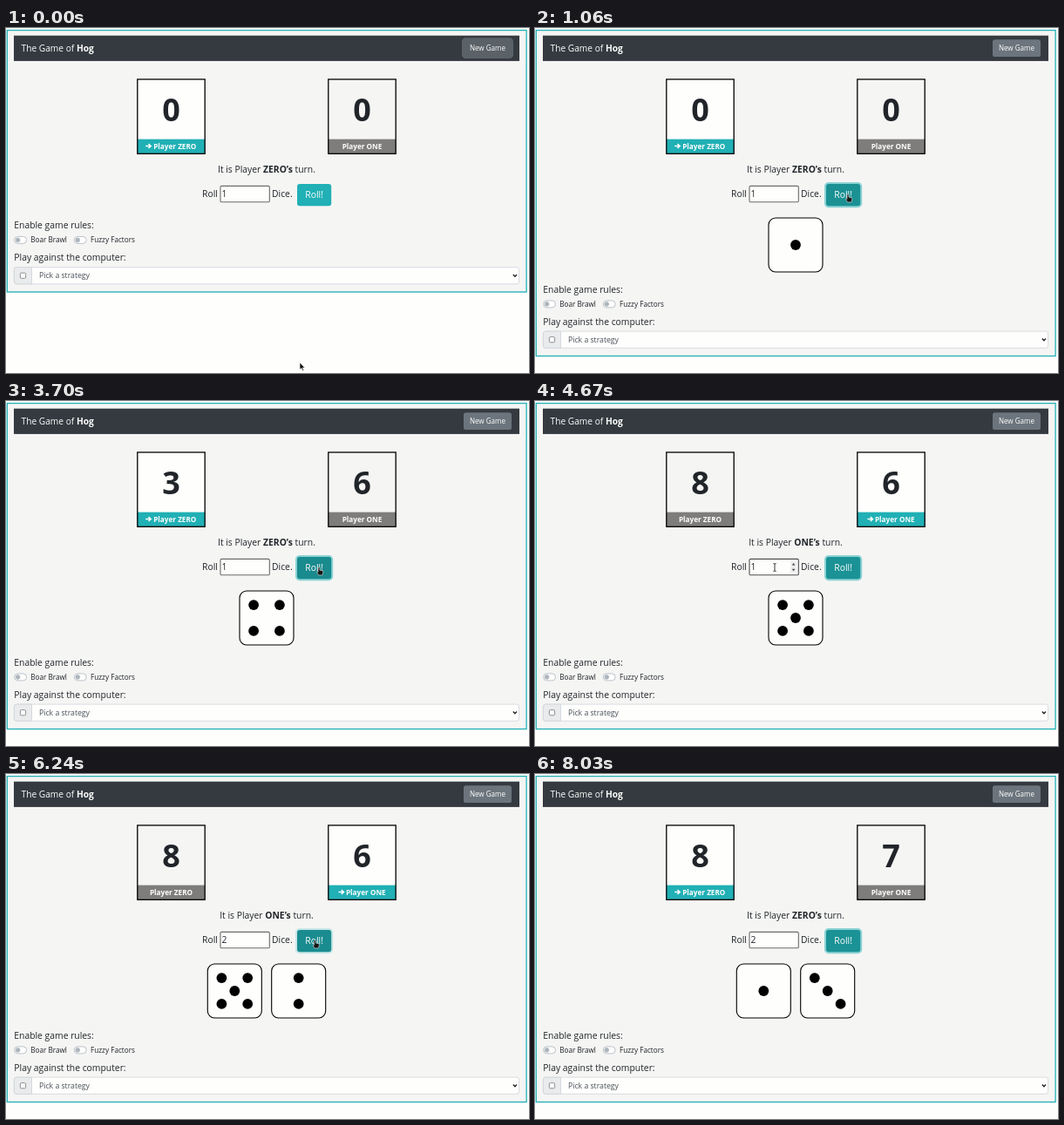
An HTML page for the animation above (8820 ms loop, 600 px wide and 396 px high).

```html
<!DOCTYPE html>
<html lang="en">
<head>
<meta charset="utf-8">
<title>The Game of Hog</title>
<style>
  html, body { margin: 0; width: 100%; height: 100%; overflow: hidden; background: #fefefd; }
  svg { display: block; width: 600px; height: 396px; }
  text { font-family: "Open Sans", "Noto Sans", sans-serif; fill: #212529; white-space: pre; }
  .b { font-weight: 700; }
  .mid { text-anchor: middle; }
  .head { font-size: 10.35px; font-weight: 500; }
  .body { font-size: 10.35px; }
  .small { font-size: 8.2px; }
  .light { fill: #fefefd; }
</style>
</head>
<body>
<svg viewBox="0 0 600 396">
  <rect id="frame" x="1.3" y="2.6" width="595.8" height="300.4" fill="#f5f5f4" stroke="#20b0b5" stroke-width="1.3"/>
  <rect x="9" y="8.7" width="580" height="29.2" fill="#343a40"/>
  <text class="light" x="17.5" y="26.6" font-size="10.2">The Game of <tspan class="b">Hog</tspan></text>
  <rect id="newRing" x="523" y="11.3" width="59" height="23.8" rx="4.5" fill="#5b6268"/>
  <rect id="newBtn" x="525" y="13.3" width="55" height="19.8" rx="2.7"/>
  <text class="light mid" x="552.5" y="26" font-size="8.05">New Game</text>

  <g id="cards"></g>

  <text id="turn" class="body mid" x="299" y="166.3">It is Player <tspan id="who" class="b"></tspan> turn.</text>
  <text class="body" x="225" y="194.2">Roll</text>
  <rect id="input" x="246" y="181.4" width="56.3" height="18.4" rx="1.4" fill="#fefefd"/>
  <g id="spin">
    <rect x="293" y="184" width="7.2" height="13.2" fill="#efefef"/>
    <path d="M294.8 188.4l1.8-2.4 1.8 2.4zM294.8 192.8l1.8 2.4 1.8-2.4z" fill="#444"/>
  </g>
  <text id="value" class="body" x="247.6" y="194.3"></text>
  <rect id="caret" x="253.7" y="185" width="0.8" height="11" fill="#111"/>
  <text class="body" x="305" y="194.2">Dice.</text>
  <rect id="rollRing" x="332" y="177" width="43.2" height="29.2" rx="4.8" fill="#20b0b5" fill-opacity=".5"/>
  <rect id="rollBtn" x="334" y="179" width="39.2" height="25.2" rx="3"/>
  <text class="light body mid" x="353.6" y="195.2">Roll!</text>

  <g id="dice"></g>

  <g id="options">
    <text class="head" x="9.3" y="230">Enable game rules:</text>
    <g id="toggles" fill="#fefefd" stroke="#adb5bd" stroke-width=".8"></g>
    <text class="small" x="28.2" y="246.4">Boar Brawl</text>
    <text class="small" x="97" y="246.4">Fuzzy Factors</text>
    <text class="head" x="9.3" y="267.2">Play against the computer:</text>
    <rect x="9.4" y="274.6" width="579.2" height="19.2" rx="2.7" fill="#fefefd" stroke="#ced4da" stroke-width=".8"/>
    <path d="M29.5 274.6H12.1a2.7 2.7 0 0 0-2.7 2.7V291.1a2.7 2.7 0 0 0 2.7 2.7H29.5z" fill="#e9ebec" stroke="#ced4da" stroke-width=".8"/>
    <rect x="16.4" y="281.1" width="6.2" height="6.2" rx="1.2" fill="#fefefd" stroke="#767676" stroke-width=".8"/>
    <text x="38" y="287.3" font-size="8.7" style="fill:#495057">Pick a strategy</text>
    <path d="M581.8 283l2.1 2.3 2.1-2.3" fill="none" stroke="#222" stroke-width="1.3"/>
  </g>

  <g id="cursor" stroke-linejoin="round">
    <path id="arrow" d="M0 0V8.2L1.9 6.5 3.2 9.4 4.5 8.8 3.2 6H5.8z" fill="#111" stroke="#fefefd" stroke-width=".6"/>
    <path id="hand" d="M-1 .8Q0-.6 1 .8V3.6L4 4.2Q5 4.6 4.8 6L4 9.4H-.4L-2.4 6.4Q-2.8 5-1 5.8z" fill="#151515" stroke="#dfe9e9" stroke-width=".6"/>
    <path id="beam" d="M-1.6-4.5Q0-4.5 0-3.5Q0-4.5 1.6-4.5M0-3.5V3.5M-1.6 4.5Q0 4.5 0 3.5Q0 4.5 1.6 4.5" fill="none" stroke="#222" stroke-width=".9"/>
  </g>
</svg>
<script>
const LOOP = 8820, GROW = 73.5, FADE = 150;
const FOCUS_INPUT = 5250, PRESSES = [790, 2080, 3610, 6180];
const NORMAL = [32, 176, 181], HOVER = [27, 146, 149], ACTIVE = [24, 132, 136];

const $ = id => document.getElementById(id);
const set = (el, attrs) => { for (const k in attrs) el.setAttribute(k, attrs[k]); };
const show = (el, on) => set(el, { visibility: on ? "visible" : "hidden" });
const clamp = v => Math.max(0, Math.min(1, v));
const mix = (a, b, p) => a.map((v, i) => v + (b[i] - v) * p);
const rgb = c => `rgb(${c.map(Math.round)})`;
const ease = p => p * p * (3 - 2 * p);

// index of the last entry that has begun
function current(list, t) {
  let i = 0;
  while (i + 1 < list.length && list[i + 1][0] <= t) i++;
  return i;
}

// [time, score zero, score one, player to move]
const turns = [[0, 0, 0, 0], [1670, 3, 0, 1], [3150, 3, 6, 0], [4670, 8, 6, 1], [7210, 8, 7, 0]];

// [time, faces...]
const rolls = [
  [0], [850, 4], [1060, 1], [1240, 5], [1480, 6], [1670, 3],
  [2130, 5], [2330, 4], [2550, 1], [2730, 6],
  [3670, 4], [3880, 2], [4060, 6], [4270, 2], [4480, 5],
  [6210, 5, 2], [6420, 1, 3], [6610, 4, 6], [6820, 2, 2], [7000, 1, 1], [7210, 1, 3]
];

const path = [
  [0, 337, 384], [30, 337, 384], [540, 359, 190.5], [3990, 359, 190.5],
  [4480, 275, 191], [4940, 275, 191], [5220, 297, 187], [5657, 297, 187],
  [6060, 354.5, 190.5], [7360, 354.5, 190.5], [8000, 602, -12]
];

const shades = [[0, NORMAL], [490, HOVER]];
for (const p of PRESSES) {
  if (p > FOCUS_INPUT) shades.push([FOCUS_INPUT, NORMAL], [5950, HOVER]);
  shades.push([p, ACTIVE], [p + 130, HOVER]);
}

const pips = {
  1: [[0, 0]],
  2: [[0, -1], [0, 1]],
  3: [[-1, -1], [0, 0], [1, 1]],
  4: [[-1, -1], [1, -1], [-1, 1], [1, 1]]
};
pips[5] = [...pips[4], [0, 0]];
pips[6] = [...pips[4], [-1, 0], [1, 0]];

function die(cx, face) {
  const dots = pips[face].map(([x, y]) => `<circle cx="${cx + x * 14.9}" cy="${249 + y * 14.9}" r="5.9"/>`);
  return `<rect x="${cx - 31}" y="218" width="62" height="62" rx="8" fill="#fefefd" stroke="#000" stroke-width="1.1"/>${dots.join("")}`;
}

function card(cx, name, score, active, arrowX) {
  const y = 135.5, x = cx - arrowX;
  const mark = active
    ? `<path d="M${x} ${y}h5M${x + 3.3} ${y - 2.4}l2.7 2.4-2.7 2.4" fill="none" stroke="#fefefd" stroke-width="1.5"/>` : "";
  return `<rect x="${cx - 38.7}" y="58.9" width="77.4" height="85.4" fill="${active ? "#fefefd" : "#f5f5f4"}"/>
    <rect x="${cx - 38.7}" y="127.6" width="77.4" height="16.7" fill="${active ? "#20b0b5" : "#7e7d7c"}"/>
    <rect x="${cx - 38.7}" y="58.9" width="77.4" height="85.4" fill="none" stroke="#000" stroke-width="1.3"/>
    <text class="b mid" x="${cx}" y="107.4" font-size="36">${score}</text>${mark}
    <text class="b mid light small" x="${cx + (active ? 4.3 : 0)}" y="138.5">Player ${name}</text>`;
}

$("toggles").innerHTML = [9.6, 78.2].map(x =>
  `<rect x="${x}" y="239.4" width="14" height="8" rx="4"/><circle cx="${x + 4}" cy="243.4" r="2.4" fill="#adb5bd"/>`).join("");

let lastTurn = -1, lastRoll = -1;

function drawGame(t) {
  const turn = current(turns, t), roll = current(rolls, t);
  if (turn !== lastTurn) {
    const [, zero, one, player] = turns[lastTurn = turn];
    $("cards").innerHTML = card(189.5, "ZERO", zero, player === 0, 29.3) + card(408.5, "ONE", one, player === 1, 27);
    $("who").textContent = (player ? "ONE" : "ZERO") + "’s";
  }
  if (roll !== lastRoll) {
    const faces = rolls[lastRoll = roll].slice(1);
    $("dice").innerHTML = faces.map((f, i) => die(299 + (i - (faces.length - 1) / 2) * 73.4, f)).join("");
    const grow = faces.length ? GROW : 0;
    set($("frame"), { height: 300.4 + grow });
    set($("options"), { transform: `translate(0 ${grow})` });
  }
}

function drawButtons(t) {
  const i = current(shades, t);
  const from = shades[Math.max(0, i - 1)][1];
  set($("rollBtn"), { fill: rgb(mix(from, shades[i][1], clamp((t - shades[i][0]) / FADE))) });

  const since = at => clamp((t - at) / FADE);
  const ring = since(PRESSES[0]) - since(FOCUS_INPUT) + since(PRESSES[3]);
  set($("rollRing"), { opacity: ring });

  const blur = since(PRESSES[0]);
  set($("newRing"), { opacity: 1 - blur });
  set($("newBtn"), { fill: rgb(mix([90, 98, 104], [108, 117, 125], blur)) });
}

function drawPointer(t) {
  const i = current(path, t);
  const [t0, ...a] = path[i], [t1, ...b] = path[i + 1] || [LOOP, ...a];
  const [x, y] = mix(a, b, ease((t - t0) / (t1 - t0)));
  const inside = (l, top, r, bottom) => x >= l && x <= r && y >= top && y <= bottom;
  const overRoll = inside(334, 179, 373, 204), overInput = inside(245, 181, 303, 200);
  const typing = overInput && (x < 293 || x > 300.5);
  const focused = t >= FOCUS_INPUT && t < PRESSES[3];

  set($("cursor"), { transform: `translate(${x} ${y})` });
  show($("hand"), overRoll);
  show($("beam"), typing);
  show($("arrow"), !overRoll && !typing);

  set($("input"), {
    stroke: focused ? "#101010" : overInput ? "#4f4f4f" : "#6c6c6c",
    "stroke-width": focused ? 1.9 : 1.1
  });
  show($("spin"), overInput || focused);
  show($("caret"), focused);
  $("value").textContent = t < FOCUS_INPUT ? "1" : "2";
}

const start = performance.now();
function tick(now) {
  const t = Math.max(0, now - start) % LOOP;
  drawGame(t);
  drawButtons(t);
  drawPointer(t);
  requestAnimationFrame(tick);
}
tick(start);
</script>
</body>
</html>
```
